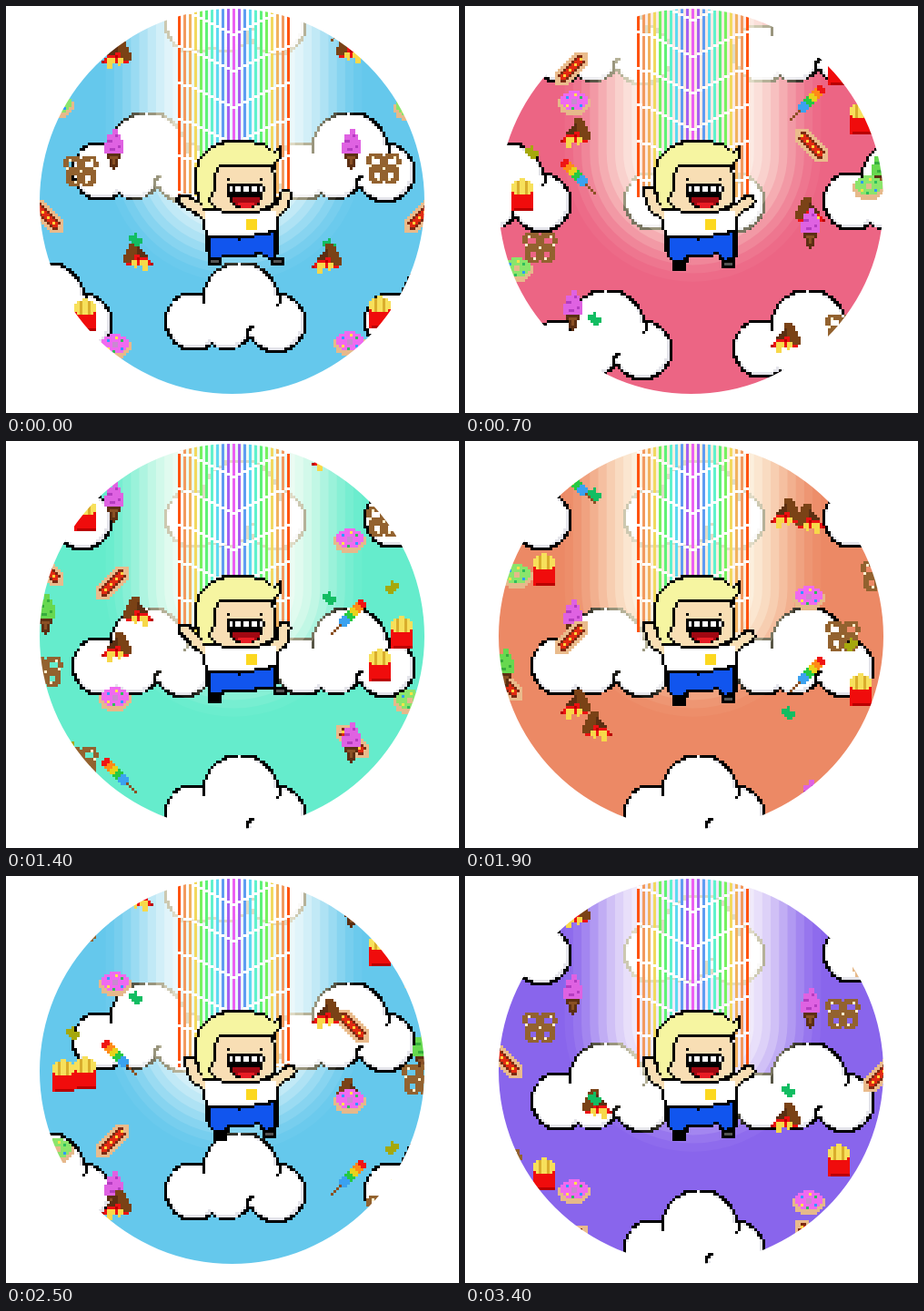
An HTML page with a canvas for the animation above (3500 ms loop, 498 by 447 pixels).

```html
<!DOCTYPE html>
<html lang="en">
<head>
<meta charset="utf-8">
<title>Falling through snack clouds</title>
<style>
html, body { margin: 0; width: 100%; height: 100%; overflow: hidden; background: #fff; }
canvas { display: block; width: 498px; height: 447px; }
</style>
</head>
<body>
<canvas id="stage" width="498" height="447"></canvas>
<script>
const ctx = document.getElementById('stage').getContext('2d');
const CELL = 3;
const mod = (a, n) => ((a % n) + n) % n;
const snap = v => Math.round(v / CELL) * CELL;

const rect = (x, y, w, h) => `M${x} ${y}h${w}v${h}h${-w}z`;
const oval = (x, y, rx, ry = rx) =>
  `M${x - rx} ${y}a${rx} ${ry} 0 1 0 ${2 * rx} 0a${rx} ${ry} 0 1 0 ${-2 * rx} 0z`;
const dots = (...points) => points.map(([x, y]) => rect(x, y, 1, 1)).join('');

function makeCanvas(w, h) {
  const c = document.createElement('canvas');
  c.width = w;
  c.height = h;
  return c;
}

// Parts are [colour, path, line width]; every part gets hard pixel edges.
function sprite(w, h, parts) {
  const out = makeCanvas(w, h), target = out.getContext('2d');
  for (const [color, path, line] of parts) {
    const layer = makeCanvas(w, h), g = layer.getContext('2d');
    const shape = new Path2D(path);
    g.fillStyle = g.strokeStyle = color;
    g.lineWidth = line || 1;
    if (line) g.stroke(shape); else g.fill(shape);
    const data = g.getImageData(0, 0, w, h);
    for (let i = 3; i < data.data.length; i += 4) data.data[i] = data.data[i] > 120 ? 255 : 0;
    g.putImageData(data, 0, 0);
    target.drawImage(layer, 0, 0);
  }
  return out;
}

function drawSprite(img, x, y, flip) {
  ctx.save();
  ctx.translate(snap(x), snap(y));
  ctx.scale(flip ? -CELL : CELL, CELL);
  ctx.drawImage(img, flip ? -img.width : 0, 0);
  ctx.restore();
}

const lobes = [[28, 15, 14.4], [11, 22.5, 11], [23, 23, 10.2], [41, 23, 11.2]];
const cloud = sprite(53, 35, [
  ...lobes.map(([x, y, r]) => ['#000', oval(x, y, r)]),
  ...lobes.map(([x, y, r]) => ['#e4e4ea', oval(x, y, r - 1)]),
  ...lobes.map(([x, y, r]) => ['#fff', oval(x - .4, y - .5, r - 1.4)]),
  ['#000', 'M30.5 29v-3l2-2', 1],
  ['#000', 'M14.5 13v3M42.5 12v3l-1 2', 1]
]);

const SKIN = '#f8deb4', HAIR = '#f6f5a1', BLUE = '#1155ee';
const poses = [
  { left: [4, 24], right: [41.5, 22.5], feet: [13, 45.5, 36, 45] },
  { left: [6.5, 21], right: [43, 24.5], feet: [15, 47, 33, 46] },
  { left: [4.5, 22], right: [41, 21.5], feet: [13, 46, 37, 43] }
].map(({ left, right, feet: [lx, ly, rx, ry] }) => {
  const arms = `M13 30L8.5 26.5L${left}M36 29.5L40 26.5L${right}`;
  const hands = r => oval(...left, r) + oval(...right, r);
  const legs = `M13 37V43L${lx + .5} ${ly}H${lx + 5}V44.5Q28 45.5 32 43.5L${rx + .5} ${ry + .5}L38 ${ry - 1}V35z`;
  const shirt = 'M11.5 27.5V34L13 37.5L25 38L38 35.5L38.5 27z';
  const hair = 'M12 28C9 24 7.5 18 9 12C11 5 17 2 25 2.5C31 2.5 35 4 37 6.5L39.5 4.5V8.5L37 10.5V13L24 24z';
  const face = 'M15.5 20V15L17 11.5H36.5Q39 18 37.5 24.5Q34 29 25 29Q15 29 13.5 24z';
  const mouth = 'M20 18.5H34L33 23.5Q31 27.5 27 27.5Q22 27.5 20.5 23z';
  return sprite(48, 51, [
    ['#000', rect(lx, ly, 5, 2.5)], ['#000', rect(rx, ry, 5, 3)],
    ['#555', rect(lx + 1, ly, 3, 1)], ['#555', rect(rx + 1, ry + 1, 3, 1)],
    [BLUE, legs], ['#000', legs, 1],
    ['#fff', shirt], ['#000', shirt, 1],
    ['#000', arms, 5], ['#000', hands(2.6)],
    [SKIN, arms, 3], [SKIN, hands(1.6)],
    ['#fff', rect(12, 28, 26, 6)],
    ['#fcd820', rect(27, 31, 4, 4)],
    [HAIR, hair], ['#000', hair, 1],
    [SKIN, face], ['#000', face, 1],
    ['#000', dots([20, 16], [32, 16])],
    ['#000', mouth],
    ['#a00812', 'M21.5 23H32.5L31 25.7Q27 27.5 23 25.7z'],
    ['#e81c24', oval(27, 25.6, 3, 1.2)],
    ['#fff', [21, 23, 25, 27, 29, 31].map(x => rect(x, 19, 1.6, 2)).join('')],
    ['#000', [22, 25, 28, 31].map(x => rect(x, 19, 1, 2)).join('')]
  ]);
});

const donut = (icing, hole) => sprite(12, 9, [
  ['#e6b98b', oval(6, 4.7, 6, 4.3)],
  [icing, oval(6, 3.8, 5, 3.6)],
  [hole, oval(6, 4, 1.5, 1)],
  ['#2f9bff', dots([3, 2], [8, 5])],
  ['#ffe34a', dots([6, 1], [3, 5])],
  ['#2fbf5b', dots([8, 2], [5, 6])]
]);
const cone = (main, dark) => sprite(7, 15, [
  ['#5c2f12', 'M0.5 9H6.5L4 15H3z'],
  ['#8a5024', 'M2 10H5L3.5 13z'],
  [main, 'M3 0H5V2H6V4H7V9H0V5H1V2H3z'],
  [dark, 'M1 4.5H3M4 2.5H5M2 7.5H4M5 6.5H6', 1]
]);
const candy = color => sprite(5, 5, [
  [color, 'M0 1H2V0H3V2H5V4H4V5H2V4H1V3H0z']
]);
const food = {
  donut: donut('#f06af0', '#c98ad0'),
  mint: donut('#8be56b', '#e6b98b'),
  cone: cone('#df62e2', '#b43cc0'),
  lime: cone('#67d84f', '#36ad3c'),
  mintCandy: candy('#12bd62'),
  limeCandy: candy('#a5a80c'),
  fries: sprite(8, 12, [
    ['#f7e05b', 'M1 1H3V0H5V1H7V2H8V7H0V2H1z'],
    ['#d9ad2c', 'M2.5 1V6M5.5 1V6', 1],
    ['#f00c0c', 'M0 5H1V6H7V5H8V12H0z'],
    ['#b90000', rect(1, 11, 7, 1)]
  ]),
  pretzel: sprite(13, 11, [
    ['#93622f', oval(3.5, 3, 2.4) + oval(9.5, 3, 2.4) + oval(4, 7.8, 2.2) + oval(9, 7.8, 2.2), 1.8],
    ['#fff0cf', dots([2, 1], [10, 1], [1, 4], [11, 4], [4, 9], [8, 9], [6, 5])]
  ]),
  hotdog: sprite(12, 12, [
    ['#eabb8c', 'M0 8L8 0H11L12 1V4L4 12H1L0 11z'],
    ['#7d2a13', 'M2 10L10 2', 4],
    ['#e22a12', 'M2.5 9.5L9.5 2.5', 1.8],
    ['#ffd23c', dots([3, 8], [5, 6], [7, 4], [9, 2])]
  ]),
  pop: sprite(13, 13, [
    ['#8a5024', 'M8 8L13 13', 1.2],
    ...['#ef1515', '#ff8a18', '#e8d31c', '#25c943', '#3ba2f0'].map((color, i) => {
      const p = .7 + i * 1.55;
      return [color, `M${p} ${p}l2.4 2.4`, 4];
    })
  ]),
  pizza: sprite(11, 12, [
    ['#ec1212', 'M4 2L11 8V9H1z'],
    ['#7a4216', 'M3 0H6V2L3 8H0V6z'],
    ['#5c2f12', 'M5 2H6L9 6H7L5 5z'],
    ['#f7d84a', 'M3 7H5V10H4V9H3zM6 7H9V11H7V9H6z'],
    ['#b90000', dots([10, 8], [5, 6])]
  ])
};

// [kind, x, y at time zero, flipped]
const slow = [
  ['fries', 87, 340], ['pizza', 120, 54, 1], ['pretzel', 83, 180], ['hotdog', 117, 415],
  ['mintCandy', 142, 257], ['lime', 42, 16], ['cone', 379, 158], ['pizza', 353, 278, 1],
  ['donut', 378, 370], ['fries', 435, 36], ['hotdog', 455, 230], ['pop', 375, 20, 1],
  ['limeCandy', 424, -12, 1], ['mint', 443, 113], ['pretzel', 453, 346]
];
const fast = [
  ['donut', 120, 372], ['pizza', 145, 277], ['cone', 118, 157], ['pop', 124, 10],
  ['limeCandy', 72, -18], ['fries', 63, 29], ['mint', 57, 110], ['hotdog', 44, 230, 1],
  ['pretzel', 44, 342], ['pretzel', 415, 177], ['pizza', 378, 49], ['fries', 411, 336],
  ['hotdog', 382, -25, 1], ['mintCandy', 355, 261], ['lime', 456, 3]
];

function drawFood(list, tick, turns, height) {
  for (const [kind, x, y, flip] of list) {
    const img = food[kind];
    const fall = mod(y + tick * turns * height / 35 + 20, height) - 20;
    drawSprite(img, x - img.width * CELL / 2, fall - img.height * CELL / 2, flip);
  }
}

function drawClouds(tick) {
  const middle = mod(278 - 65 * tick, 325);
  for (let k = -2; k < 2; k++) {
    const y = middle + k * 325;
    [-40, 174, 393].forEach(x => drawSprite(cloud, x, y));
    [73, 293].forEach(x => drawSprite(cloud, x, y + 162));
  }
}

function drawGlow() {
  ctx.globalCompositeOperation = 'screen';
  for (let i = 1; i <= 9; i++) {
    const r = 150 - i * 9.2;
    ctx.fillStyle = `rgba(240,232,180,${i * .042})`;
    ctx.beginPath();
    ctx.arc(250.5, 162, r, 0, Math.PI);
    ctx.lineTo(250.5 - r, 0);
    ctx.lineTo(250.5 + r, 0);
    ctx.fill();
  }
  ctx.globalCompositeOperation = 'source-over';
}

function drawRainbow(tick) {
  const hues = [17, 24, 34, 50, 110, 130, 165, 190, 215, 270, 298];
  hues.forEach((hue, i) => {
    const d = 60 - i * 6;
    ctx.fillStyle = `hsl(${hue},${i ? 85 : 100}%,${i ? 66 : 53}%)`;
    for (const x of [249 - d, 249 + d]) ctx.fillRect(x, 0, 3, 210);
  });
  ctx.fillStyle = '#fff';
  const top = mod(2 - 8 * tick, 40) - 40;
  for (let y = top; y < 205; y += 40)
    for (let d = 0; d <= 60; d += 3) {
      const lineY = y + 28 - Math.round(d / 6.4) * 3;
      ctx.fillRect(249 - d, lineY, 3, 3);
      ctx.fillRect(249 + d, lineY, 3, 3);
    }
}

function maskOutside() {
  ctx.fillStyle = '#fff';
  ctx.beginPath();
  ctx.rect(0, 0, 498, 447);
  ctx.arc(248.5, 214.5, 211.5, 0, 7);
  ctx.fill('evenodd');
}

function draw(tick) {
  // The hue turns back 30 degrees a tick and holds one tick behind midway.
  const turn = tick - (tick > 9 && tick < 28 ? 1 : 0);
  ctx.fillStyle = `hsl(${mod(196 - 30 * turn, 360)},78%,66%)`;
  ctx.fillRect(0, 0, 498, 447);
  drawClouds(tick);
  drawGlow();
  drawRainbow(tick);
  drawSprite(poses[tick % 3], 183, 141);
  drawFood(fast, tick, 2, 445);
  drawFood(slow, tick, 1, 434);
  maskOutside();
}

ctx.imageSmoothingEnabled = false;
const start = performance.now();
function loop() {
  draw(Math.floor((performance.now() - start) / 100) % 35);
  requestAnimationFrame(loop);
}
loop();
</script>
</body>
</html>
```
